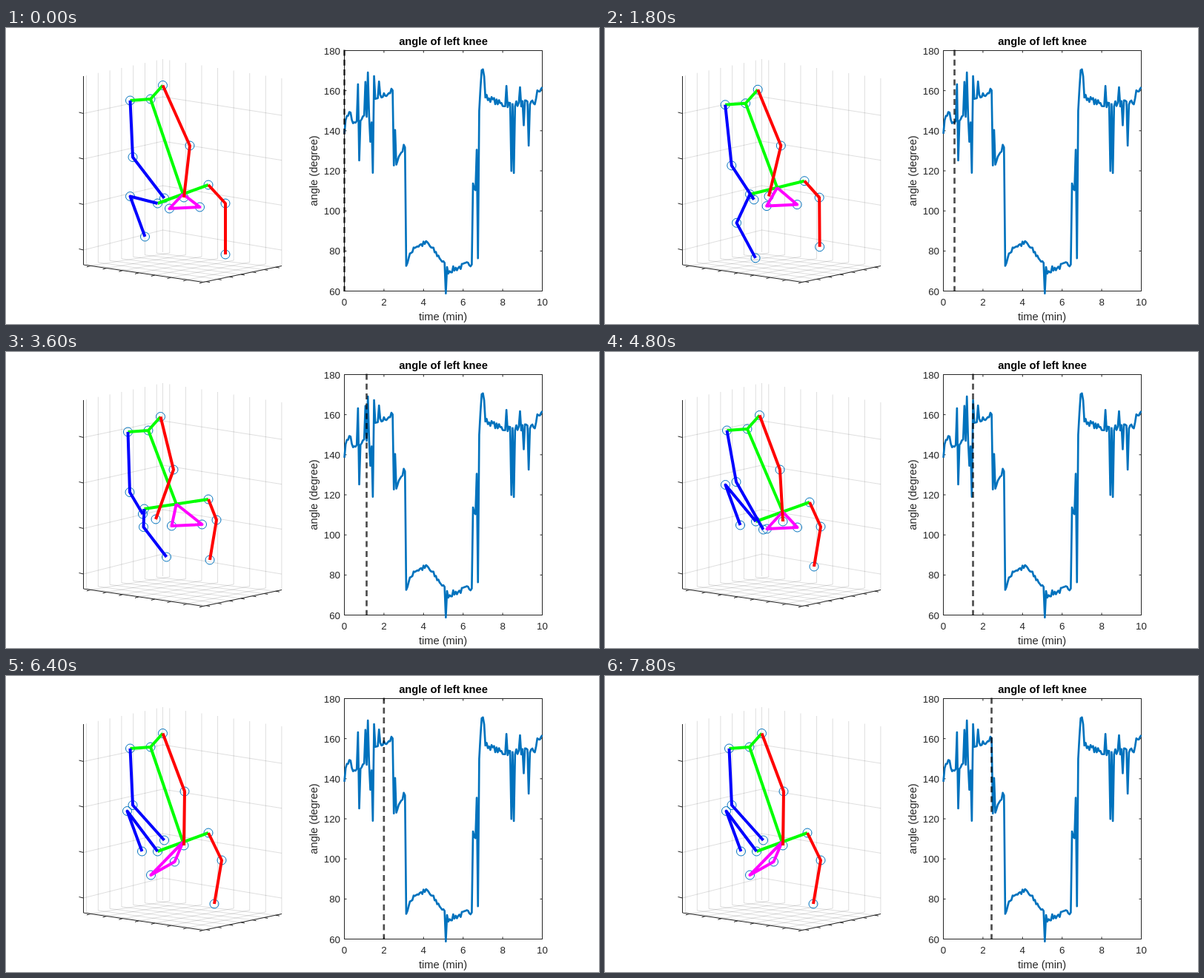
An HTML page that plays this animation: 800 px wide and 400 px high, repeating every 8 s.

```html
<!DOCTYPE html>
<html lang="en">
<head>
<meta charset="utf-8">
<title>Knee angle</title>
<style>
  html, body { margin: 0; width: 100%; height: 100%; overflow: hidden; background: #fff; }
  svg { display: block; width: 100vw; height: 100vh; }
  text { font: 13.33px "Liberation Sans", Arial, sans-serif; fill: #262626; }
  .label { font-size: 14.67px; text-anchor: middle; }
  .title { font-weight: bold; fill: #000; }
  path { fill: none; }
  .grid { stroke: #262626; stroke-opacity: .15; }
  .axis { stroke: #262626; }
  .curve { stroke: #0072bd; stroke-width: 2.67; stroke-linejoin: round; }
  .bone { stroke-width: 4; stroke-linejoin: round; }
  .joint { fill: none; stroke: #0072bd; }
</style>
</head>
<body>
<svg id="stage" viewBox="0 0 800 400"></svg>
<script>
const LOOP = 8000, STEP = 200;
const stage = document.getElementById('stage');

function add(tag, attrs, text) {
  const el = document.createElementNS('http://www.w3.org/2000/svg', tag);
  for (const k in attrs) el.setAttribute(k, attrs[k]);
  if (text !== undefined) el.textContent = text;
  return stage.appendChild(el);
}
const mix = (a, b, u) => a + (b - a) * u;
const mixPoint = (p, q, u) => [mix(p[0], q[0], u), mix(p[1], q[1], u)];
const seg = (p, q) => `M${p}L${q}`;
const ramp = (t, a, b) => Math.min(1, Math.max(0, (t - a) / (b - a)));
const tent = (t, at, half) => Math.max(0, 1 - Math.abs(t - at) / half);

function seeded(s) {
  return () => (s = (s * 16807) % 2147483647) / 2147483647;
}

// 3D box: floor corners and wall tops
const left = [104.5, 320], front = [266, 343.5], right = [372, 321.5], back = [211.5, 303];
const leftTop = [104.5, 65], backTop = [211.5, 42], rightTop = [372, 68];

function drawBox() {
  let grid = seg(back, backTop);
  let axis = seg(leftTop, left) + seg(left, front) + seg(front, right);
  const tick = (p, dx, dy) => { axis += seg(p, [p[0] + dx, p[1] + dy]); };
  for (let i = 0; i < 7; i++) {
    const u = 0.038 + i * 0.1475;
    const a = mixPoint(left, back, u), b = mixPoint(front, right, u);
    grid += seg(a, b) + seg(a, mixPoint(leftTop, backTop, u));
    tick(b, 5, 1);
  }
  for (let i = 0; i < 8; i++) {
    const u = 0.058 + i * 0.1345;
    const a = mixPoint(back, right, u), b = mixPoint(left, front, u);
    grid += seg(a, b) + seg(a, mixPoint(backTop, rightTop, u));
    tick(b, -5, 1.5);
  }
  for (let i = 0; i < 4; i++) {
    const p = [104.5, 115.5 + i * 61.5];
    const corner = [211.5, 93 + i * 60];
    grid += seg(p, corner) + seg(corner, [372, 118 + i * 60.7]);
    tick(p, -6, -1.5);
  }
  add('path', { d: grid, class: 'grid' });
  add('path', { d: axis, class: 'axis' });
}

// Chart: 16 samples a minute; a level with single-sample spikes and jitter
const plot = { x: 456.5, y: 30.5, w: 267, h: 325 };
const SAMPLES = 160;
const levels = [
  [0, 140], [2, 148], [5, 149], [7, 143], [16, 147], [23, 145], [24, 155], [39, 160],
  [40, 122], [49, 133], [50, 73], [56, 82], [67, 84], [78, 76], [84, 70], [103, 74],
  [104, 115], [106, 110], [109, 150], [111, 171], [113, 168], [114, 157], [128, 153],
  [154, 154], [156, 159], [160, 161]
];
const spikes = {
  11: 18, 12: -21, 17: 19, 19: 23, 21: -12, 23: -26, 24: 11, 28: 7, 41: 16, 82: -12,
  107: 8, 108: -61, 131: 9, 135: -34, 137: -33, 142: 7, 145: -12, 149: -21
};

function levelAt(n) {
  const i = Math.max(1, levels.findIndex(l => l[0] >= n));
  const [a, va] = levels[i - 1], [b, vb] = levels[i];
  return mix(va, vb, (n - a) / (b - a));
}
const plotX = min => plot.x + plot.w * min / 10;
const plotY = deg => plot.y + plot.h * (180 - deg) / 120;

function drawChart() {
  const { x, y, w, h } = plot;
  let axis = `M${x} ${y}h${w}v${h}h${-w}z`;
  for (let v = 0; v <= 10; v += 2) {
    const px = plotX(v);
    axis += `M${px} ${y}v3M${px} ${y + h}v-3`;
    add('text', { x: px, y: 375, 'text-anchor': 'middle' }, v);
  }
  for (let v = 60; v <= 180; v += 20) {
    const py = plotY(v);
    axis += `M${x} ${py}h3M${x + w} ${py}h-3`;
    add('text', { x: 451, y: py + 5, 'text-anchor': 'end' }, v);
  }
  add('path', { d: axis, class: 'axis' });

  const random = seeded(7);
  const points = [];
  for (let n = 0; n <= SAMPLES; n++) {
    const deg = levelAt(n) + (spikes[n] || 0) + (random() - 0.5) * 3;
    points.push([plotX(n / 16), plotY(deg)]);
  }
  add('path', { d: 'M' + points.join('L'), class: 'curve' });
  add('text', { x: 590, y: 23, class: 'label title' }, 'angle of left knee');
  add('text', { x: 589.5, y: 395, class: 'label' }, 'time (min)');
  add('text', { transform: 'translate(420 193) rotate(-90)', class: 'label' }, 'angle (degree)');
}

// Skeleton: a home pose and the shifts that each movement adds
const home = {
  neck: [188, 105], shoulderL: [160.5, 107], shoulderR: [204.5, 86.5],
  hipL: [203.5, 229], hipR: [272, 204],
  elbowL: [179, 179.5], wristL: [215.5, 244], elbowR: [236, 159], wristR: [240, 229],
  kneeL: [161.5, 188.5], ankleL: [181.5, 243], kneeR: [290, 233], ankleR: [281, 287],
  baseL: [214.5, 240], baseR: [255.5, 238]
};
const chest = 'neck shoulderL shoulderR', base = 'baseL baseR';
const legL = 'kneeL ankleL', legR = 'kneeR ankleR';

const moves = {
  rise: {
    weight: t => 1 - ramp(t, 900, 2800) + ramp(t, 4800, 6400),
    shifts: [[chest, 7, -9], ['hipL hipR', 1, 8], ['elbowL', -8, -5], ['wristL', -2, -22],
      ['elbowR', 12, 0], [legL, 2, -6], ['kneeR', 6, 4], ['ankleR', 5, 9], [base, 6, 4]]
  },
  sway: {
    weight: t => tent(t, 4800, 1200) - ramp(t, 0, 1800) * (1 - ramp(t, 2800, 3600)),
    shifts: [[`${chest} hipR ${base}`, 4, -1], ['elbowL wristL', -2, -4],
      [legL, 1, -9], [legR, 1, 3]]
  },
  twist: {
    weight: t => tent(t, 1800, 1000) / 2 + tent(t, 3600, 800),
    shifts: [[chest, 4, 1], ['hipL', -17, -17], ['hipR', 1, -5], ['elbowL', -12, 10],
      ['wristL', -31, -25], ['elbowR', -10, 0], ['wristR', -38, -3],
      ['kneeL', 24, 48], ['ankleL', 35, 34], [legR, -6, -6], [base, 9, -5]]
  },
  step: {
    weight: t => 1 - ramp(t, 1800, 2800),
    shifts: [[legL, 4, 45], ['ankleR', 10, 10], ['wristL', 0, 8]]
  },
  turn: {
    weight: t => ramp(t, 4800, 6400),
    shifts: [['baseL', -25, 25], ['baseR', -34, 9], [legR, -5, 12], ['elbowR', -7, -3]]
  }
};

const bones = [
  ['#0f0', 'shoulderL neck shoulderR', 'neck pelvis', 'hipL pelvis hipR'],
  ['#00f', 'shoulderL elbowL wristL', 'hipL kneeL ankleL'],
  ['#f0f', 'pelvis baseL baseR pelvis'],
  ['#f00', 'shoulderR elbowR wristR', 'hipR kneeR ankleR']
];

function poseAt(t) {
  const pose = {};
  for (const name in home) pose[name] = [...home[name]];
  for (const { weight, shifts } of Object.values(moves)) {
    const w = weight(t);
    for (const [names, dx, dy] of shifts)
      for (const name of names.split(' ')) {
        pose[name][0] += w * dx;
        pose[name][1] += w * dy;
      }
  }
  pose.pelvis = mixPoint(pose.hipL, pose.hipR, 0.5);
  return pose;
}

drawBox();
drawChart();
const joints = Object.keys(home).map(name => [name, add('circle', { r: 6, class: 'joint' })]);
const limbs = bones.map(([stroke, ...chains]) =>
  [chains.map(c => c.split(' ')), add('path', { stroke, class: 'bone' })]);
const cursor = add('path', {
  stroke: '#000', 'stroke-opacity': .7, 'stroke-width': 2.67, 'stroke-dasharray': '8 5.3'
});

function draw(ms) {
  const t = Math.floor(ms % LOOP / STEP) * STEP;
  const pose = poseAt(t);
  for (const [name, el] of joints) {
    el.setAttribute('cx', pose[name][0]);
    el.setAttribute('cy', pose[name][1]);
  }
  for (const [chains, el] of limbs)
    el.setAttribute('d', chains.map(c => 'M' + c.map(n => pose[n]).join('L')).join(''));
  cursor.setAttribute('d', `M${456.5 + t / STEP * 5 / 3} 29.5V356`);
}

const start = performance.now();
function tick() {
  draw(performance.now() - start);
  requestAnimationFrame(tick);
}
tick();
</script>
</body>
</html>
```
